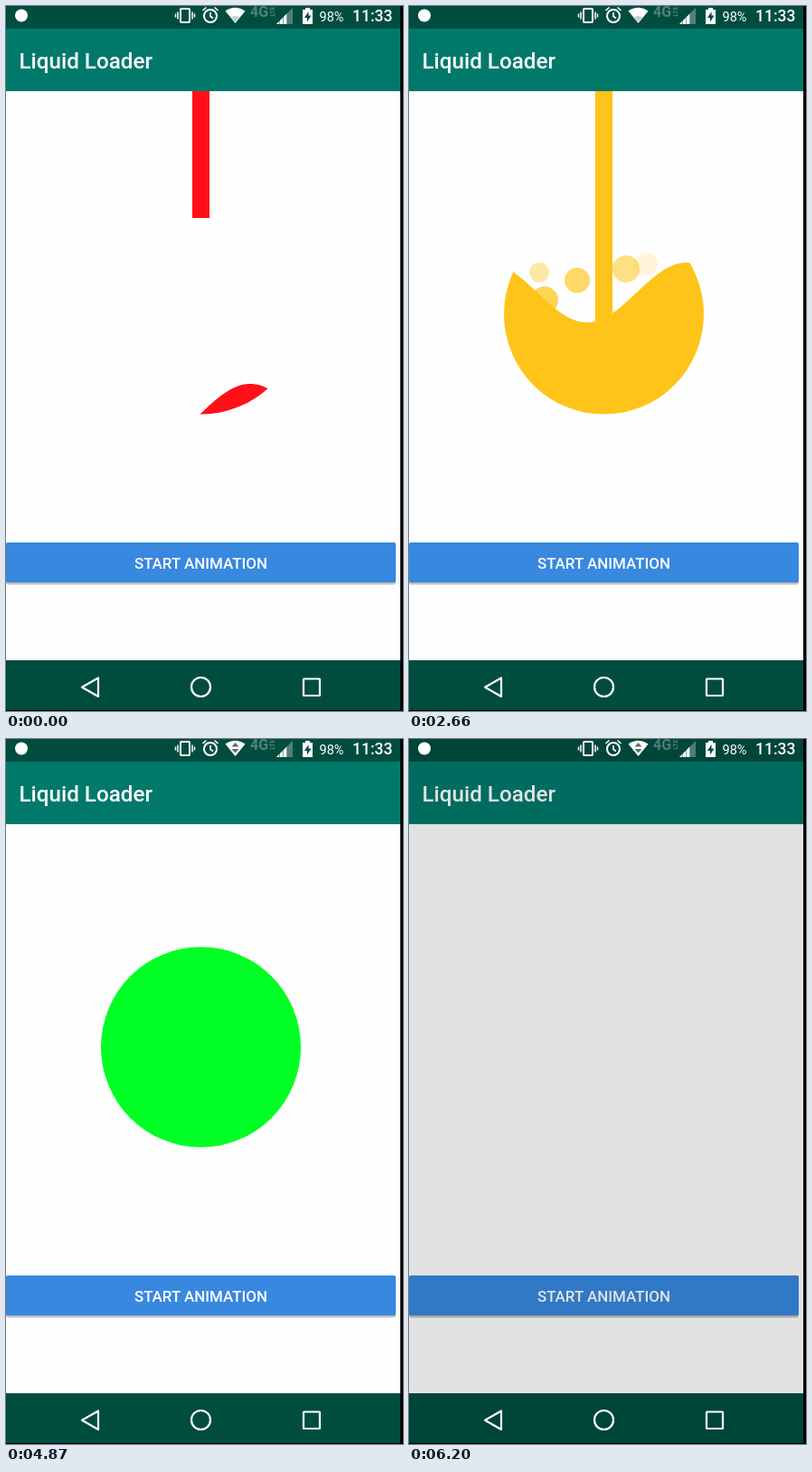
Write an HTML page that moves like this. It is 439 px wide and 778 px high and loops after 6630 ms.

```html
<!DOCTYPE html>
<html lang="en">
<head>
<meta charset="utf-8">
<title>Liquid Loader</title>
<style>
  html, body { margin: 0; width: 100%; height: 100%; overflow: hidden; background: #000; }
  svg { display: block; width: 439px; height: 778px; font-family: Roboto, "Noto Sans", sans-serif; }
  .medium { font-weight: 500; }
</style>
</head>
<body>
<svg viewBox="0 0 439 778" xmlns="http://www.w3.org/2000/svg">
  <defs>
    <clipPath id="bowl"><circle cx="215.5" cy="340" r="110.5"/></clipPath>
  </defs>
  <rect width="439" height="778"/>
  <rect width="436" height="777" fill="#fefefe"/>

  <g id="loader">
    <g id="bubbles"></g>
    <rect id="stream" x="206" width="19"/>
    <g id="bounce"><g clip-path="url(#bowl)"><path id="liquid"/></g></g>
  </g>

  <rect width="436" height="94" fill="#00796b"/>
  <rect width="436" height="25" fill="#004d40"/>
  <rect y="722" width="436" height="55" fill="#004d40"/>
  <text class="medium" x="14.5" y="69" font-size="24.2" fill="#fff">Liquid Loader</text>
  <rect y="594" width="431" height="45" rx="3" fill="#000" opacity=".14"/>
  <rect y="593" width="431" height="44.5" rx="2" fill="#000" opacity=".2"/>
  <rect y="592" width="431" height="44" rx="2" fill="#3788de"/>
  <text class="medium" x="215.5" y="621" font-size="16.95" fill="#fff" text-anchor="middle">START ANIMATION</text>

  <rect id="dim" width="436" height="777"/>

  <g fill="#fff">
    <circle cx="17" cy="10.5" r="7"/>
    <g fill="none" stroke="#fff" stroke-width="2">
      <rect x="193" y="3" width="10" height="15" rx="1"/>
      <path d="M190 6.5v8M206 6.5v8M187.5 8.500v4M208.500 8.500v4" stroke-width="1.5"/>
      <circle cx="226" cy="11" r="7"/>
      <path d="M226 7v4.500l3 2M217.500 5l4-3.500M234.500 5l-4-3.500" stroke-width="1.600"/>
    </g>
    <path d="M242.500 5.500Q253.500-2 264.500 5.500L253.500 19Z"/>
    <path id="idle" d="M249 12.500Q253.500 9.500 258 12.500L253.500 18Z" fill="#004d40" opacity=".25"/>
    <path id="traffic" d="M249.500 8.500l4-4.500 4 4.500zM249.500 11l4 4.500 4-4.500z" fill="#5c6f6b"/>
    <g opacity=".3" font-weight="700">
      <text x="270" y="11.500" font-size="16">4G</text>
      <text font-size="6.500" transform="translate(297 11.500) rotate(-90)">LTE</text>
    </g>
    <path d="M299 20L317 2V20Z" opacity=".3"/>
    <path d="M299 20L311 8V20Z"/>
    <path d="M302.500 3V20M306.500 3V20M310.500 3V20" stroke="#004d40" opacity=".5"/>
    <path d="M331 2h5v2h3v16h-11V4h3z"/>
    <path d="M334.500 6l-4.500 7h3v4.500l4.500-7h-3z" fill="#004d40"/>
    <text x="346.500" y="16.500" font-size="14.500">98%</text>
    <text class="medium" x="383" y="17" font-size="17.500">11:33</text>
  </g>
  <g fill="none" stroke="#fff" stroke-width="2.200" stroke-linejoin="round">
    <path d="M102 741.500V762L84 751.700Z"/>
    <circle cx="215.500" cy="751.500" r="10.500"/>
    <rect x="329" y="742.500" width="18" height="18.500" rx=".5"/>
  </g>

  <g id="dialog">
    <rect x="22" y="284" width="390" height="201" rx="10" opacity=".13"/>
    <rect id="innerShadow" x="34" y="290" width="373" height="183" rx="8"/>
    <rect x="25.500" y="282" width="380" height="183" rx="2" fill="#fff"/>
    <text class="medium" x="55" y="330.500" font-size="24.2" fill="#212121">Alert</text>
    <text x="55" y="380" font-size="19.4" fill="#212121">Pour Finished Event</text>
    <text class="medium" x="340" y="437" font-size="16.95" fill="#4155e0">OK</text>
  </g>
</svg>

<script>
const LOOP = 6.63, TOP = 94, BOTTOM = 450, FULL = 220;
const FILL_START = 0.754, FILL_RATE = 70.2, STREAM_SPEED = 288;
const BOUNCE_START = 3.83, BOUNCE_TIME = 0.47, DIALOG_IN = 4.91, DIALOG_OUT = 5.89;
const BUBBLE_LIFE = 0.9;

const el = id => document.getElementById(id);
const set = (node, attrs) => { for (const k in attrs) node.setAttribute(k, attrs[k]); };
const clamp = (v, lo = 0, hi = 1) => Math.min(hi, Math.max(lo, v));
const span = (t, from, to) => clamp((t - from) / (to - from));

// time, red, green, blue
const COLORS = [
  [0.75, 255, 16, 25], [3.28, 255, 255, 25], [3.85, 206, 255, 25], [4.25, 0, 255, 36]
];

// birth time, x, radius, rise
const BUBBLES = [
  [0.78, 99, 11, 85], [1.02, 128, 10, 33], [1.11, 249, 11, 53], [1.16, 238, 5, 56],
  [1.7, 170, 12, 45], [1.86, 262, 13, 42], [2.02, 144, 11, 35], [2.18, 240, 15, 46],
  [2.34, 186, 14, 40], [2.5, 276, 14, 34], [2.64, 150, 15, 38],
  [3.34, 148, 17.5, 25], [3.41, 251, 20, 17],
  [3.93, 153.5, 18.5, 105], [3.93, 196, 19.5, 156], [3.93, 182, 14, 56], [3.93, 256, 17, 84]
].map(([birth, x, r, rise]) => {
  const node = document.createElementNS("http://www.w3.org/2000/svg", "circle");
  set(node, { cx: x, r });
  el("bubbles").append(node);
  return { birth, rise, node };
});

function colorAt(t) {
  const i = clamp(COLORS.findIndex(c => c[0] > t), 0, COLORS.length);
  if (t >= COLORS[COLORS.length - 1][0]) return rgb(COLORS[COLORS.length - 1].slice(1));
  if (i === 0) return rgb(COLORS[0].slice(1));
  const a = COLORS[i - 1], b = COLORS[i], p = span(t, a[0], b[0]);
  return rgb([1, 2, 3].map(k => Math.round(a[k] + (b[k] - a[k]) * p)));
}

function rgb(channels) { return `rgb(${channels})`; }

function wavePath(t, level, filled) {
  const amp = 33 * clamp((1 - filled) / 0.2);
  const crest = 270 + 92 * t + 1.7 * t * t;
  let d = "M100 460";
  for (let x = 100; x <= 332; x += 2) {
    const y = level - amp * Math.cos((x - crest) * 2 * Math.PI / 220);
    d += `L${x} ${y.toFixed(2)}`;
  }
  return d + "V460Z";
}

function drawLoader(t) {
  const height = clamp((t - FILL_START) * FILL_RATE, 0, FULL);
  const level = BOTTOM - height;
  const full = height === FULL;
  el("loader").setAttribute("fill", colorAt(t));
  el("loader").setAttribute("visibility", t < DIALOG_IN ? "visible" : "hidden");

  set(el("liquid"), { d: full ? "M100 220H332V460H100Z" : wavePath(t, level, height / FULL) });
  const bounce = 28 * Math.sin(Math.PI * span(t, BOUNCE_START, BOUNCE_START + BOUNCE_TIME));
  set(el("bounce"), { transform: `translate(0 ${bounce.toFixed(2)})` });

  const head = Math.min(234 + STREAM_SPEED * t, 449);
  const tail = TOP + STREAM_SPEED * Math.max(0, t - 3.65);
  set(el("stream"), { y: tail, height: Math.max(0, head - tail) });

  for (const { birth, rise, node } of BUBBLES) {
    const p = (t - birth) / BUBBLE_LIFE;
    const alive = p > 0 && p < 1;
    set(node, {
      cy: level + 10 - rise * (1 - (1 - p) ** 2),
      opacity: alive ? 0.75 * (1 - p * p) : 0
    });
  }
}

function drawDialog(t) {
  const enter = span(t, DIALOG_IN, 5.69);
  const dim = t < DIALOG_OUT ? 0.6 * enter : 0.6 - 0.492 * span(t, DIALOG_OUT, 6.2);
  const alpha = (1 - (1 - enter) ** 4) * (1 - span(t, DIALOG_OUT, 6.1));
  set(el("dim"), { opacity: dim });
  set(el("dialog"), { opacity: alpha });
  set(el("innerShadow"), { opacity: 0.08 * (1 - enter) });
}

function render(t) {
  drawLoader(t);
  drawDialog(t);
  const busy = t >= 4.5;
  set(el("traffic"), { opacity: busy ? 1 : 0 });
  set(el("idle"), { opacity: busy ? 0 : 0.25 });
}

let start;
function tick(now) {
  start ??= now;
  render(((now - start) / 1000) % LOOP);
  requestAnimationFrame(tick);
}
render(0);
requestAnimationFrame(tick);
</script>
</body>
</html>
```
